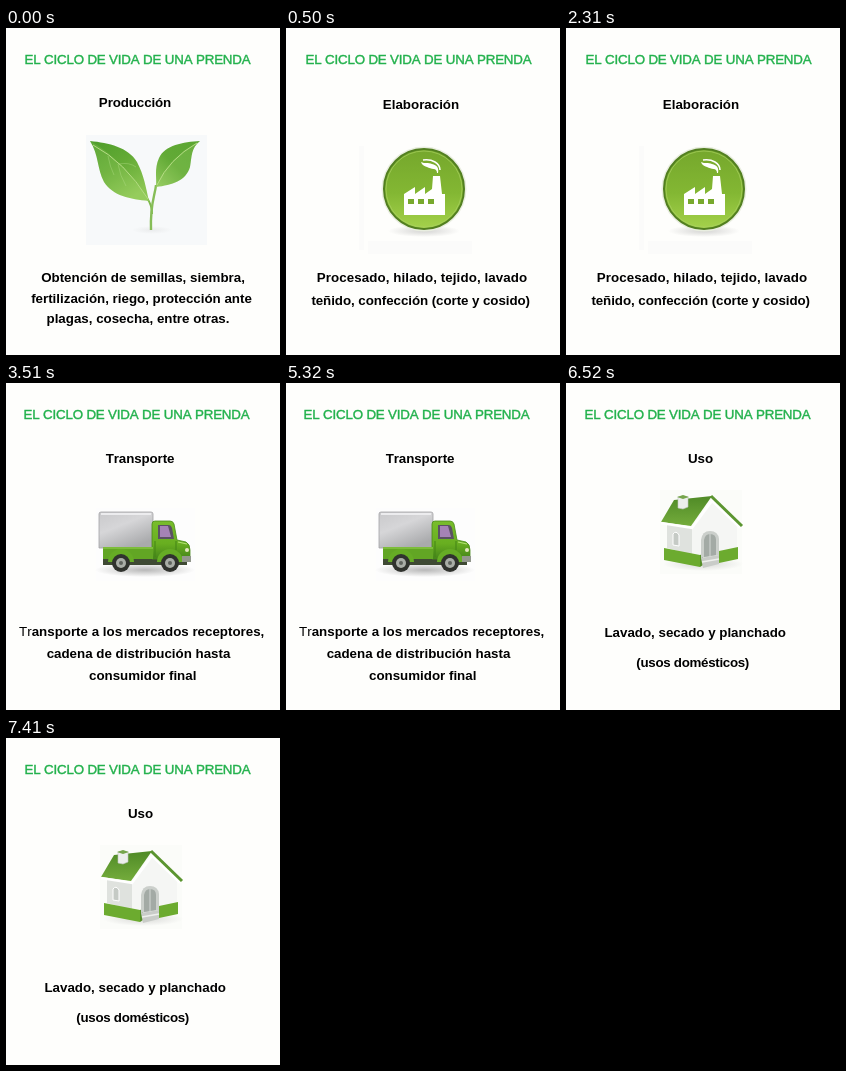
Recreate the animation shown at these times as an HTML page. Size 274x327 px, loop 8000 ms.

```html
<!DOCTYPE html>
<html lang="es">
<head>
<meta charset="utf-8">
<title>El ciclo de vida de una prenda</title>
<style>
html, body { margin: 0; width: 100%; height: 100%; overflow: hidden; background: #fefefc; }
svg { display: block; width: 100%; height: 100%; }
text { font: bold 13.33px "Liberation Sans", Arial, sans-serif; text-anchor: middle; fill: #000; font-kerning: none; }
.title { font-weight: normal; fill: #22b14c; stroke: #22b14c; stroke-width: .4; }
.light { font-weight: normal; }
</style>
</head>
<body>
<svg viewBox="0 0 274 327">
  <defs>
    <linearGradient id="leafL" x1="0" y1="0" x2=".6" y2="1">
      <stop offset="0" stop-color="#4d9c2a"/><stop offset=".5" stop-color="#64ab35"/><stop offset="1" stop-color="#8cc653"/>
    </linearGradient>
    <linearGradient id="leafR" x1="1" y1="0" x2="0" y2="1">
      <stop offset="0" stop-color="#5aa531"/><stop offset=".55" stop-color="#62aa36"/><stop offset="1" stop-color="#8fc75a"/>
    </linearGradient>
    <linearGradient id="disc" x1="0" y1="0" x2="0" y2="1">
      <stop offset="0" stop-color="#75a72c"/><stop offset=".55" stop-color="#83b733"/><stop offset="1" stop-color="#a5d24c"/>
    </linearGradient>
    <linearGradient id="box" x1="0" y1="0" x2=".6" y2="1">
      <stop offset="0" stop-color="#c9c9cb"/><stop offset=".45" stop-color="#d6d6d8"/><stop offset="1" stop-color="#a9aaac"/>
    </linearGradient>
    <linearGradient id="cab" x1="0" y1="0" x2="0" y2="1">
      <stop offset="0" stop-color="#79bd2c"/><stop offset=".6" stop-color="#68ae20"/><stop offset="1" stop-color="#44841a"/>
    </linearGradient>
    <linearGradient id="roof" x1="0" y1="0" x2="0" y2="1">
      <stop offset="0" stop-color="#4f8a26"/><stop offset="1" stop-color="#74ac3c"/>
    </linearGradient>
    <radialGradient id="shade">
      <stop offset="0" stop-color="#8a8a8a" stop-opacity=".6"/><stop offset="1" stop-color="#8a8a8a" stop-opacity="0"/>
    </radialGradient>
  </defs>

  <g class="scene">
    <rect x="80" y="107" width="121" height="110" fill="#f7f9fa"/>
    <ellipse cx="146" cy="202" rx="20" ry="4" fill="url(#shade)" opacity=".2"/>
    <path d="M141 170Q146 177 146 186" fill="none" stroke="#7fb84c" stroke-width="2"/>
    <path d="M150 157C149 168 144 175 145 202" fill="none" stroke="#86bd57" stroke-width="2.4"/>
    <path d="M84 113C103 115 122 119 131 134C138 147 140 160 143 173C124 171 107 168 98 154C91 141 93 127 84 113Z" fill="url(#leafL)"/>
    <path d="M84 113C105 124 125 145 143 173C124 171 107 168 98 154C91 141 93 127 84 113Z" fill="#d5f09c" opacity=".12"/>
    <path d="M87 117Q119 134 142 171" fill="none" stroke="#b5dc84" stroke-width="1"/>
    <path d="M102 128Q104 139 108 147M112 136Q114 148 120 158M113 136Q123 134 130 139" fill="none" stroke="#bde291" stroke-width=".6" opacity=".6"/>
    <path d="M194 113C177 114 159 117 153 130C148 141 151 150 150 159C166 157 180 153 184 139C186 128 185 120 194 113Z" fill="url(#leafR)"/>
    <path d="M194 113C174 123 158 139 150 159C166 157 180 153 184 139C186 128 185 120 194 113Z" fill="#d5f09c" opacity=".12"/>
    <path d="M191 115Q163 131 151 157" fill="none" stroke="#b5dc84" stroke-width="1"/>
  </g>

  <g class="scene">
    <path d="M73 118H78V222H73ZM82 213H186V226H82Z" fill="#fbfbfa"/>
    <ellipse cx="138" cy="203" rx="36" ry="6" fill="url(#shade)" opacity=".6"/>
    <circle cx="138" cy="161" r="42.5" fill="#e9eee0"/>
    <circle cx="138" cy="161" r="40" fill="url(#disc)" stroke="#527f20" stroke-width="2"/>
    <circle cx="138" cy="161" r="38" fill="none" stroke="#a9d160" stroke-width="1" opacity=".7"/>
    <path d="M118 187V166L129 159V166L139 159V166L146 161L147 148H154L156 166H159V187Z" fill="#fff"/>
    <path d="M122 171h6v5h-6zM132 171h6v5h-6zM142 171h6v5h-6z" fill="#78a92e"/>
    <path d="M151 145C151 139 145 142 141 139C138 138 136 137 135 134C139 136 142 134 146 136C151 137 153 140 152 145Z" fill="#fff"/>
    <path d="M137 132Q144 131 149 134Q154 137 154 142" fill="none" stroke="#fff" stroke-width="1.5"/>
  </g>

  <g class="scene">
    <rect x="90" y="125" width="99" height="73" fill="#fdfdfd"/>
    <ellipse cx="139" cy="187" rx="50" ry="7" fill="url(#shade)"/>
    <path d="M97 172H181V182H97Z" fill="#3f4a34"/>
    <path d="M93 131Q93 129 95 129H145Q147 129 147 131V165H93Z" fill="url(#box)" stroke="#a2a3a5" stroke-width=".8"/>
    <path d="M95 131H145" stroke="#ececee" stroke-width="2"/>
    <path d="M146 141Q146 138 149 138H164Q167 138 168 141L171 157L180 159Q184 161 184 167V176H146Z" fill="url(#cab)" stroke="#4a8b1b" stroke-width=".8"/>
    <path d="M152 142H163Q165 142 166 145L168 156H152Z" fill="#5b5263"/>
    <path d="M154 143H162L165 154H154Z" fill="#a583b5"/>
    <path d="M149 158V174M170 158V167" stroke="#438317" fill="none"/>
    <path d="M172 159L181 161" stroke="#b4e175" stroke-width="1.2"/>
    <path d="M97 164H147V176H97Z" fill="#62a624"/>
    <path d="M97 165H147" stroke="#86c443" stroke-width="1.5"/>
    <path d="M102 179A13 13 0 0 1 128 179ZM151 179A13 13 0 0 1 177 179Z" fill="#66ac25"/>
    <path d="M176 173H185V179H176Z" fill="#92978d"/>
    <circle cx="181" cy="167" r="2" fill="#e3e8c0"/>
    <g class="wheels"></g>
  </g>

  <g class="scene">
    <rect x="94" y="107" width="82" height="84" fill="#fbfcf9"/>
    <ellipse cx="137" cy="181" rx="40" ry="7" fill="url(#shade)" opacity=".5"/>
    <path d="M101 140L127 145V172L101 165Z" fill="#dfe2de"/>
    <path d="M126 145L146 118L171 143V170L134 178L126 176Z" fill="#f5f6f4"/>
    <path d="M98 165L134 172V184L98 177Z" fill="#6cab2f"/>
    <path d="M134 172L137 171V182L134 184Z" fill="#568e28"/>
    <path d="M153 168L172 164V176L153 180Z" fill="#6cab2f"/>
    <path d="M135 175L153 172V181L137 185Z" fill="#c9ccc8"/>
    <path d="M136 179L153 176" stroke="#eef0ed" stroke-width="1.5"/>
    <path d="M108 117L146 113L125 143L95 139Z" fill="url(#roof)"/>
    <path d="M95 140L126 145L146 118L174 145" fill="none" stroke="#fff" stroke-width="2.4"/>
    <path d="M145 113L176 143" fill="none" stroke="#5b9530" stroke-width="3"/>
    <path d="M112 125V114L117 113L122 114V124L117 126Z" fill="#eceeec" stroke="#c3c7c3" stroke-width=".6"/>
    <path d="M111 114L117 112L123 114L117 116Z" fill="#76a54c"/>
    <path d="M107 162V151Q110 147 113 152V163Z" fill="#c5cac5" stroke="#fff"/>
    <path d="M135 175V157Q136 148 144 148Q152 148 153 156V172Z" fill="#cbcfcb"/>
    <path d="M138 174V157Q139 151 144 151Q150 151 150 157V172Z" fill="#a3aaa5"/>
    <path d="M144 151V173" stroke="#d3d7d4"/>
  </g>
</svg>
<script>
const LOOP = 8000;
const TITLE = "EL CICLO DE VIDA DE UNA PRENDA";
// Each line: text, centre x, baseline, letter spacing, light lead-in
const scenes = [
  { start: 0, titleX: 131.5, lines: [
    ["Producción", 129, 79, -.1],
    ["Obtención de semillas, siembra,", 137, 254],
    ["fertilización, riego, protección ante", 135.5, 275],
    ["plagas, cosecha, entre otras.", 132, 295]] },
  { start: 500, titleX: 132.5, lines: [
    ["Elaboración", 135, 81],
    ["Procesado, hilado, tejido, lavado", 136, 254, .1],
    ["teñido, confección (corte y cosido)", 134.7, 277, -.06]] },
  { start: 3510, titleX: 130.5, lines: [
    ["Transporte", 134, 80, -.1],
    ["ansporte a los mercados receptores,", 135.7, 253, 0, "Tr"],
    ["cadena de distribución hasta", 132.5, 275],
    ["consumidor final", 136.7, 297]] },
  { start: 6520, titleX: 131.5, lines: [
    ["Uso", 134.5, 80],
    ["Lavado, secado y planchado", 129.2, 254],
    ["(usos domésticos)", 126.7, 284, -.3]] }
];
const groups = [...document.querySelectorAll(".scene")];

function add(parent, tag, attrs, content = "") {
  const el = document.createElementNS("http://www.w3.org/2000/svg", tag);
  for (const key in attrs) el.setAttribute(key, attrs[key]);
  el.textContent = content;
  parent.append(el);
  return el;
}

scenes.forEach((scene, i) => {
  add(groups[i], "text", { class: "title", x: scene.titleX, y: 35.5, "letter-spacing": -.17 }, TITLE);
  for (const [text, x, y, gap = 0, lead = ""] of scene.lines) {
    const line = add(groups[i], "text", { x, y, "letter-spacing": gap });
    if (lead) add(line, "tspan", { class: "light" }, lead);
    line.append(text);
  }
});

const wheels = document.querySelector(".wheels");
for (const cx of [115, 164])
  for (const [r, fill] of [[9, "#30322e"], [5, "#a9ada7"], [2, "#60645f"]])
    add(wheels, "circle", { cx, cy: 180, r, fill });

function draw(time) {
  const t = time % LOOP;
  const current = scenes.findLastIndex(scene => t >= scene.start);
  groups.forEach((g, i) => g.setAttribute("display", i === current ? "inline" : "none"));
}

function tick() {
  draw(performance.now());
  requestAnimationFrame(tick);
}
tick();
</script>
</body>
</html>
```
